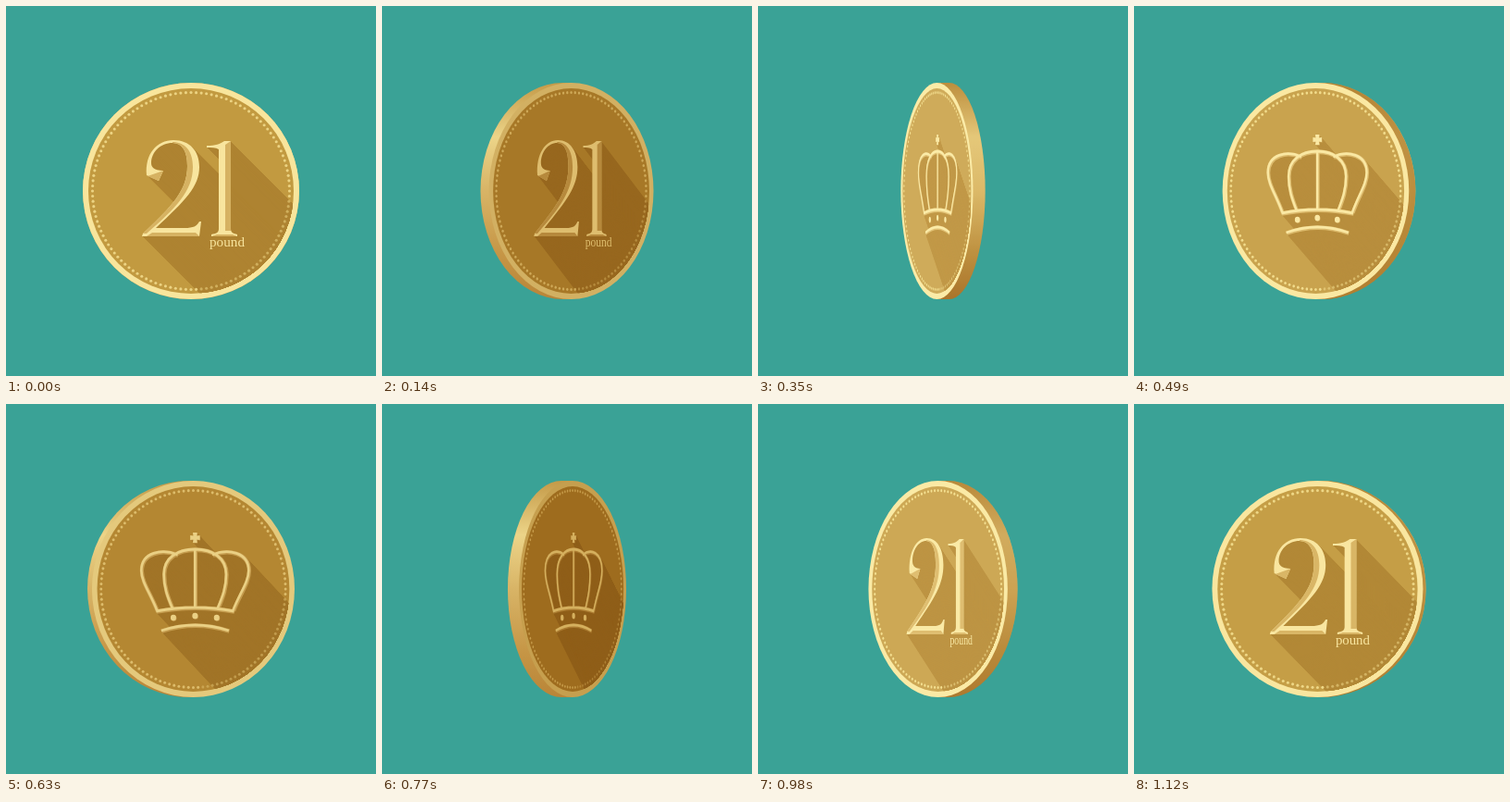
Write an HTML page with a canvas that moves like this. It is 400 px wide and 400 px high and loops after 1.19 s.

```html
<!DOCTYPE html>
<html lang="en">
<head>
<meta charset="utf-8">
<title>Spinning coin</title>
<style>
html, body { margin: 0; width: 100%; height: 100%; overflow: hidden; background: #3aa296; }
canvas { display: block; }
</style>
</head>
<body>
<canvas id="stage" width="400" height="400"></canvas>
<script>
const ctx = document.getElementById('stage').getContext('2d');
const STEP = 70, STEPS = 17;
const RADIUS = 117, INNER = 111, BEAD_RING = 106.5, BEADS = 120, HALF_DEPTH = 7;
// Turn in degrees at each step of a half revolution; slower near the faces.
const HALF_TURN = [20.6, 40.5, 60.3, 85, 109.5, 130, 149.5, 167];

// Each tone: turned from the light, facing front, turned to the light.
const TONES = {
  face: [[153, 101, 25], [194, 154, 64], [208, 172, 92]],
  shadow: [[138, 88, 20], [174, 131, 49], [194, 153, 72]],
  rim: [[190, 148, 66], [248, 229, 156], [251, 235, 168]],
  relief: [[208, 168, 84], [248, 229, 158], [251, 235, 168]],
  facet: [[165, 115, 40], [214, 178, 98], [226, 194, 118]],
  bead: [[192, 146, 66], [236, 211, 130], [247, 228, 150]]
};
const SIDE_LEFT = ['#c49a48', '#ecd488', '#d8b466', '#c59545', '#b98538'];
const SIDE_RIGHT = ['#bd9040', '#ead083', '#e0c070', '#bd9040', '#a8722a'];

// Face paths are centred on the coin.
const numerals = new Path2D(`
  M-48 -17 C-50 -40 -37 -55 -19 -55 C-1 -55 9 -43 9 -26 C9 -5 -6 10 -38 40
  L-7 40 C3 40 6 38 9 33 L11 33 L9 49 L-53 49 L-52 46
  C-20 16 -4 -1 -4 -27 C-4 -44 -10 -52 -20 -52 C-33 -52 -43 -42 -43 -30
  C-43 -26 -40 -22 -30 -22 L-35 -11 Z
  M17 -49 C26 -49 32 -51 36 -54 L43 -54 L43 41 C43 45 46 46 50 47 L50 49
  L22 49 L22 47 C27 46 30 45 30 41 L30 -45 C27 -47 22 -47 17 -47 Z`);
const facets = new Path2D(`
  M-20 -52 C-10 -52 -4 -44 -4 -27 C-4 -1 -20 16 -52 46 L-48 46
  C-16 18 2 0 2 -26 C2 -44 -7 -53 -20 -53 Z
  M-47 -16 L-30 -22 L-35 -11 Z M-48 49 L-42 45 L5 45 L9 49 Z
  M37 -50 L43 -54 L43 43 L37 43 Z M22 49 L28 47 L45 47 L50 49 Z`);
const crown = new Path2D(`
  M-24 21 C-30 8 -34 -2 -34 -16 C-34 -34 -18 -43 2 -43
  C22 -43 38 -34 38 -16 C38 -2 34 8 28 21 M2 -43 L2 20
  M-42 23 C-50 4 -60 -8 -60 -20 C-60 -40 -36 -44 -18 -37
  M46 23 C54 4 64 -8 64 -20 C64 -40 40 -44 22 -37
  M-43 24 Q2 16 47 24 M-37 45 Q2 33 41 45`);
const gems = new Path2D();
for (const [x, y] of [[-23, 31], [2, 29], [27, 31]]) {
  gems.moveTo(x + 3.2, y);
  gems.arc(x, y, 3.2, 0, 7);
}
gems.addPath(new Path2D('M-.5 -61 H4.5 L4 -57.5 L7.5 -58 V-53 L4 -53.5 L4.5 -50 H-.5 L0 -53.5 L-3.5 -53 V-58 L0 -57.5 Z'));

// light runs from -1 (bright) to 1 (dark)
function tone(name, light) {
  const [dark, mid, bright] = TONES[name];
  const end = light > 0 ? dark : bright;
  return `rgb(${mid.map((v, i) => Math.round(v + (end[i] - v) * Math.abs(light)))})`;
}

function drawSide(cos, sin) {
  const front = 200 + HALF_DEPTH * sin, back = 200 - HALF_DEPTH * sin;
  const stops = sin > 0 ? SIDE_LEFT : SIDE_RIGHT;
  const shade = ctx.createLinearGradient(0, 200 - RADIUS, 0, 200 + RADIUS);
  [0, .25, .5, .8, 1].forEach((at, i) => shade.addColorStop(at, stops[i]));
  const paint = () => {
    ctx.beginPath();
    ctx.ellipse(back, 200, RADIUS * cos, RADIUS, 0, 0, 7);
    ctx.fill();
    ctx.fillRect(Math.min(front, back), 200 - RADIUS, Math.abs(front - back), 2 * RADIUS);
  };
  ctx.fillStyle = shade;
  paint();
  if (sin < 0) {
    ctx.fillStyle = `rgba(180,130,50,${Math.min(.8, (1 + sin) * 2)})`;
    paint();
  }
}

function disc(r, color) {
  ctx.fillStyle = color;
  ctx.beginPath();
  ctx.arc(0, 0, r, 0, 7);
  ctx.fill();
}

function paintCrown(color, width) {
  ctx.fillStyle = ctx.strokeStyle = color;
  ctx.lineWidth = width;
  ctx.stroke(crown);
  ctx.fill(gems);
}

function paintNumerals(color) {
  ctx.fillStyle = color;
  ctx.fill(numerals);
}

function drawLongShadow(paint, color) {
  ctx.save();
  ctx.beginPath();
  ctx.arc(0, 0, INNER, 0, 7);
  ctx.clip();
  for (let i = 0; i < 165; i++) {
    ctx.translate(1, 1);
    paint(color, 4);
  }
  ctx.restore();
}

function drawBeads(color) {
  ctx.fillStyle = color;
  for (let i = 0; i < BEADS; i++) {
    const a = i / BEADS * 2 * Math.PI;
    ctx.globalAlpha = a > .08 && a < 1.5 ? .55 : 1;
    ctx.beginPath();
    ctx.arc(BEAD_RING * Math.cos(a), BEAD_RING * Math.sin(a), 1.55, 0, 7);
    ctx.fill();
  }
  ctx.globalAlpha = 1;
}

function drawFace(showCrown, cos, sin) {
  const paint = showCrown ? paintCrown : paintNumerals;
  const relief = tone('relief', sin), facet = tone('facet', sin);
  ctx.save();
  ctx.translate(200 + HALF_DEPTH * sin, 200);
  ctx.scale(cos, 1);
  disc(RADIUS, tone('rim', sin));
  disc(INNER, tone('face', sin));
  drawLongShadow(paint, tone('shadow', sin));
  drawBeads(tone('bead', sin));
  if (showCrown) {
    ctx.save();
    ctx.translate(.6, .6);
    paintCrown(facet, 4.6);
    ctx.restore();
    paintCrown(relief, 2.8);
  } else {
    paintNumerals(relief);
    ctx.fillStyle = facet;
    ctx.fill(facets);
    ctx.fillStyle = relief;
    ctx.font = '15.2px "Liberation Serif", serif';
    ctx.fillText('pound', 20, 60);
  }
  ctx.restore();
}

function draw(step) {
  const secondHalf = step > 8;
  const turn = step ? HALF_TURN[(step - 1) % 8] : 0;
  const flipped = turn > 90;
  const angle = (flipped ? turn - 180 : turn) * Math.PI / 180;
  const cos = Math.cos(angle), sin = Math.sin(angle);
  ctx.fillStyle = '#3aa296';
  ctx.fillRect(0, 0, 400, 400);
  drawSide(cos, sin);
  drawFace(flipped !== secondHalf, cos, sin);
}

let shown = -1;
const start = performance.now();
function tick() {
  const step = Math.floor((performance.now() - start) / STEP) % STEPS;
  if (step !== shown) draw(shown = step);
  requestAnimationFrame(tick);
}
tick();
</script>
</body>
</html>
```
